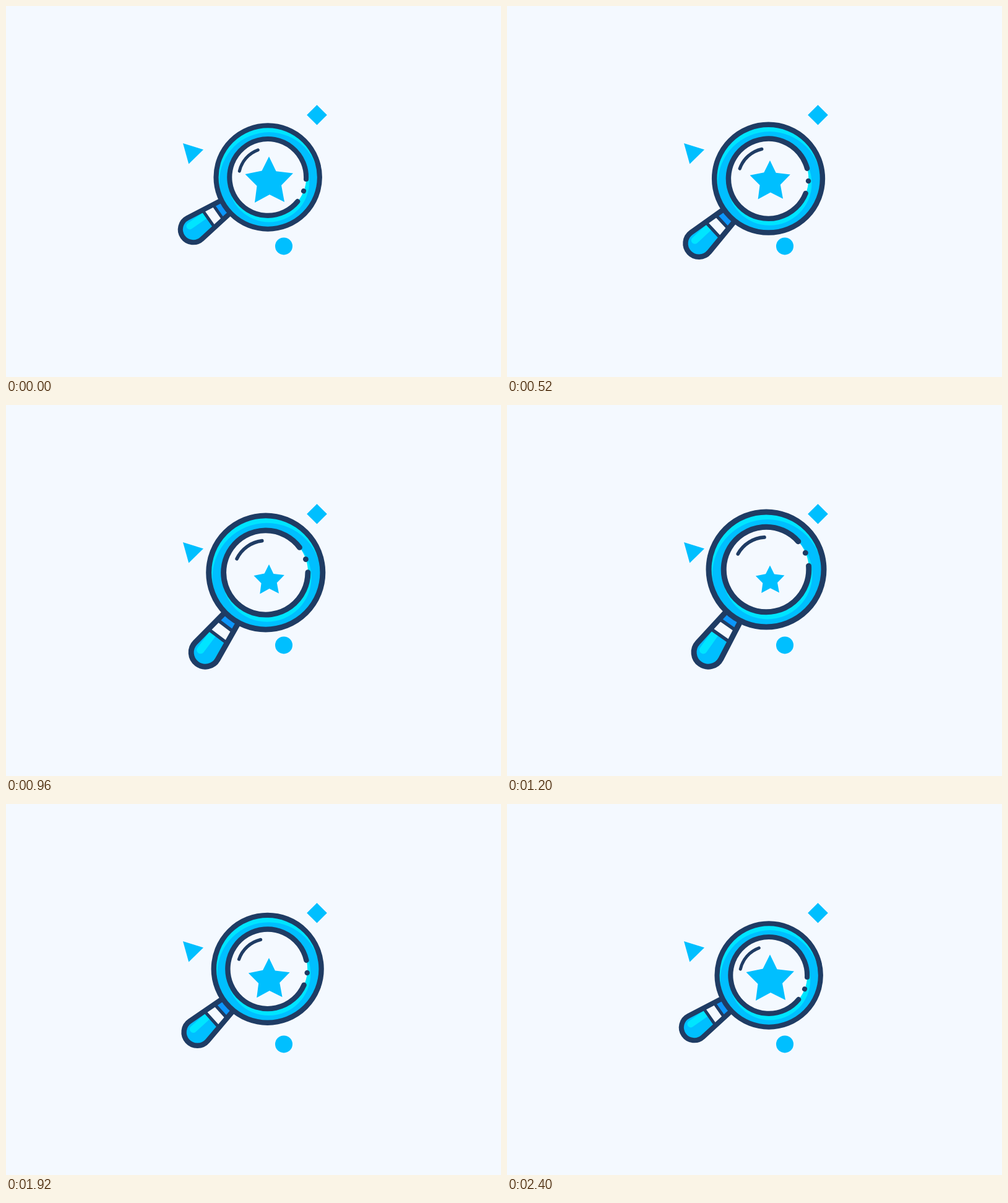
Write an HTML page that moves like this. It is 800 px wide and 600 px high and loops after 2440 ms.

```html
<!DOCTYPE html>
<html lang="en">
<head>
<meta charset="utf-8">
<title>Magnifier</title>
<style>
  html, body { margin: 0; width: 100%; height: 100%; overflow: hidden; background: #f4f9ff; }
  svg { display: block; width: 100%; height: 100%; }
  .line { stroke: #1f3c64; stroke-width: 9; }
  .sky { fill: #00bfff; }
  .cyan { fill: #00e5ff; }
  .paper { fill: #f4f9ff; }
</style>
</head>
<body>
<svg viewBox="0 0 800 600">
  <defs>
    <clipPath id="rim"><circle r="93"/></clipPath>
  </defs>
  <g class="sky">
    <path d="M502.5 160 518.8 176.2 502.5 192.5 486.2 176.2Z"/>
    <path d="M286 222 319 232.3 295.3 255.5Z"/>
    <circle cx="449" cy="388.4" r="14"/>
  </g>

  <g id="magnifier" fill="none" stroke-linecap="round">
    <g id="handle">
      <path class="sky" d="M90 -13.6 160.4 -23A23.2 23.2 0 1 1 160.4 23L90 13.6Z"/>
      <path d="M165 8.7H131" stroke="#00e5ff" stroke-width="12.5"/>
      <path d="M90 -13.6 109 -16V16L90 13.6Z" fill="#0c96fb"/>
      <path class="paper" d="M109 -16 130 -19V19L109 16Z"/>
      <path class="line" d="M109 -14V14M130 -17V17" style="stroke-width:5.5"/>
      <path class="line" d="M90 -13.6 160.4 -23A23.2 23.2 0 1 1 160.4 23L90 13.6"/>
    </g>

    <g clip-path="url(#rim)">
      <circle class="cyan" r="93"/>
      <circle class="sky" cx="2" cy="8" r="89"/>
      <circle class="cyan" cx="2" cy="8" r="72.5"/>
    </g>
    <circle class="paper" r="69"/>
    <circle class="line" r="93"/>
    <g id="gap">
      <path id="ring" class="line"/>
      <path class="line" d="M68.8 0h.01"/>
    </g>
    <path id="glint" class="line" style="stroke-width:5.6"/>
  </g>

  <path id="star" class="sky" d="M0 -39.7 11.5 -16 39 -12.7 20 6.8 25 33.8 1 21.8 -23 34.8 -19.5 7.8 -38.5 -11.2 -11.5 -16.7Z"/>
</svg>
<script>
const LOOP = 2440, CYCLE = 2400, STEP = 40;
const get = id => document.getElementById(id);
const place = (id, transform) => get(id).setAttribute('transform', transform);
const mix = (a, b, p) => a + (b - a) * p;

function arc(r, from, to) {
  const point = deg => {
    const a = deg * Math.PI / 180;
    return `${r * Math.cos(a)} ${r * Math.sin(a)}`;
  };
  return `M${point(from)}A${r} ${r} 0 ${+(to - from > 180)} 1 ${point(to)}`;
}

get('ring').setAttribute('d', arc(68.8, 18.2, 341.8));
get('glint').setAttribute('d', arc(52.2, 192.2, 250.2));

function draw(ms) {
  const time = Math.floor(ms % LOOP / STEP) * STEP;
  const angle = time / CYCLE * 2 * Math.PI;
  const linear = 1 - Math.abs(1 - time * 2 / CYCLE);
  const smooth = linear * linear * (3 - 2 * linear);
  const wave = (1 - Math.cos(angle)) / 2;

  const x = 423.2 - 4.2 * wave * wave;
  const y = 271.5 + 5.5 * Math.cos(angle) + 6.7 * Math.sin(angle);
  place('magnifier', `translate(${x} ${y}) scale(${mix(.9, 1, wave)})`);
  place('handle', `rotate(${mix(145, 125, smooth)})`);
  place('gap', `rotate(${mix(21, -23, smooth)})`);
  place('glint', `rotate(${16.5 * linear})`);
  place('star', `translate(425 283.2) scale(${mix(1, .6, wave)})`);
}

const start = performance.now();
function tick() {
  draw(performance.now() - start);
  requestAnimationFrame(tick);
}
tick();
</script>
</body>
</html>
```
